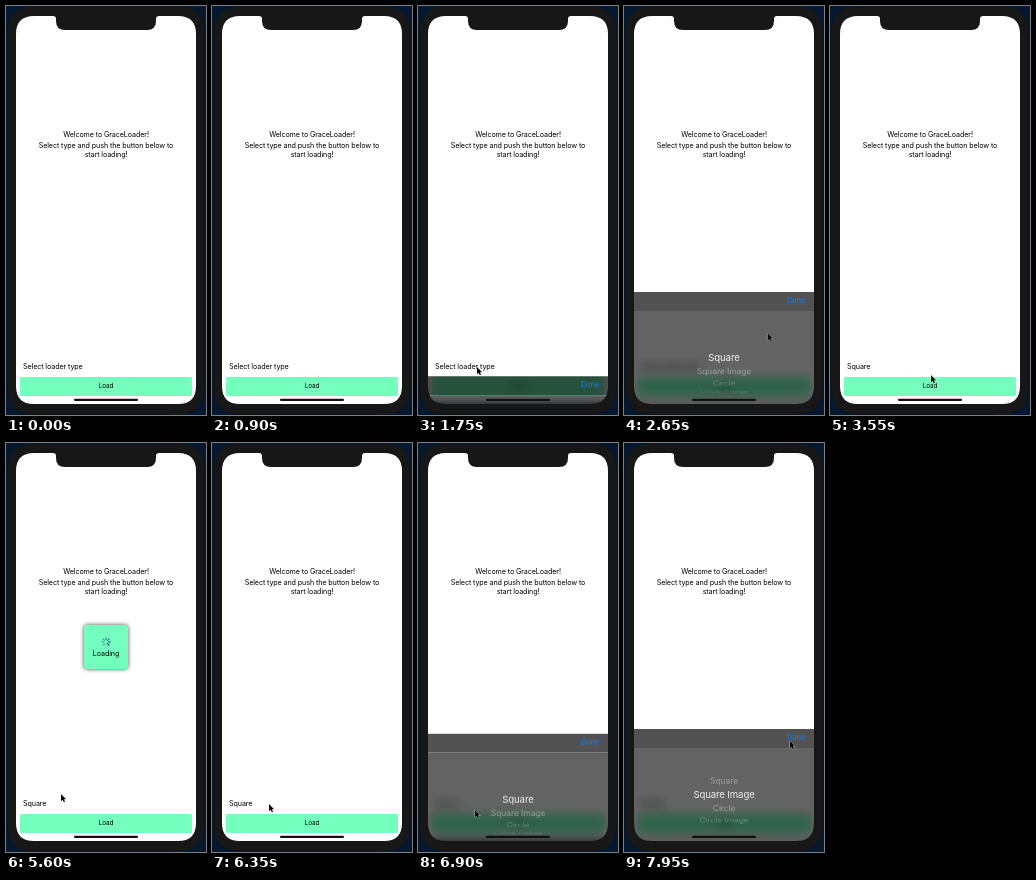
An HTML page that plays this animation: 200 by 409 pixels, repeating every 8 s.

```html
<!DOCTYPE html>
<html lang="en">
<head>
<meta charset="utf-8">
<title>Loader demo</title>
<style>
html, body { margin: 0; width: 100%; height: 100%; overflow: hidden; background: #04182f; }
#stage {
  position: relative; width: 200px; height: 409px; overflow: hidden;
  font: 7.2px/8.6px Inter, Roboto, sans-serif; letter-spacing: -.12px; color: #000;
}
#stage * { position: absolute; box-sizing: border-box; white-space: nowrap; }
#stage svg * { position: static; }
#screen { inset: 10px; bottom: 11px; background: #fff; }
.line { left: 0; width: 200px; text-align: center; }
.anim, .row { animation: 8s linear infinite; }

#load {
  left: 14px; top: 371px; width: 172px; height: 19px; border-radius: 1.5px;
  background: #74ffbe; font-size: 6.4px; line-height: 19px; text-align: center;
}
.label { left: 17px; top: 357px; }
#prompt { animation-name: prompt; }
#choice { animation-name: choice; }
@keyframes prompt { 0%, 37.24% { opacity: 1 } 37.25%, 100% { opacity: 0 } }
@keyframes choice { 0%, 37.24% { opacity: 0 } 37.25%, 100% { opacity: 1 } }

/* Loading box */
#loader {
  left: 78px; top: 182px; width: 44px; height: 44px; border-radius: 3.5px;
  background: #74ffbe; box-shadow: 0 0 4px #444; animation-name: loader;
}
#loader span { left: 0; width: 44px; top: 25px; text-align: center; }
#spinner { left: 17px; top: 12px; width: 10px; height: 10px; animation: spin 1s steps(8) infinite; }
@keyframes loader {
  0%, 48.75% { opacity: 0 }
  52.5%, 75% { opacity: 1 }
  78.75%, 100% { opacity: 0 }
}
@keyframes spin { to { transform: rotate(360deg) } }

/* Picker sheet */
#sheet { left: 10px; top: 286px; width: 180px; height: 113px; animation-name: sheet; }
#bar, #body { left: 0; width: 180px; backdrop-filter: blur(5px); }
#bar { top: 0; height: 18.5px; background: rgba(0, 0, 0, .68); }
#body { top: 18.5px; bottom: 0; background: rgba(0, 0, 0, .61); }
#done { right: 9px; top: 5px; color: #0878f5; font-size: 7.4px; font-weight: 500; }
#wheel {
  left: 0; top: 66px; width: 180px; height: 0;
  transform-style: preserve-3d; animation-name: wheel;
}
.row {
  left: 0; top: -6px; width: 180px; text-align: center; color: #eee;
  font-size: 9.6px; line-height: 12px; animation-name: row;
  --place: rotateX(calc(var(--i) * -21.8deg)) translateZ(37px);
}
@keyframes sheet {
  0%, 20.75% { transform: translateY(113px); animation-timing-function: ease }
  27%, 37.25% { transform: none; animation-timing-function: ease }
  43%, 81.625% { transform: translateY(113px); animation-timing-function: ease }
  87.875%, 100% { transform: none }
}
@keyframes wheel {
  0%, 89% { transform: rotateX(0deg); animation-timing-function: ease-in-out }
  94%, 100% { transform: rotateX(21.8deg) }
}
@keyframes row {
  0%, 89% { transform: var(--place) scale(var(--s0)); opacity: var(--o0); animation-timing-function: ease-in-out }
  94%, 100% { transform: var(--place) scale(var(--s1)); opacity: var(--o1) }
}

#cursor { left: 0; top: 0; overflow: visible; animation-name: cursor; animation-timing-function: ease-in-out; }
@keyframes cursor {
  0%, 10% { transform: translate(92px, 412px) }
  17.5%, 22.5% { transform: translate(59px, 361px) }
  29%  { transform: translate(110px, 350px); animation-timing-function: linear }
  33.125% { transform: translate(143.5px, 327.5px); animation-timing-function: ease-out }
  36.25%, 38.5% { transform: translate(172px, 295px) }
  44.375% { transform: translate(101px, 369px); animation-timing-function: ease-out }
  46%, 52% { transform: translate(101px, 377px) }
  60%, 70% { transform: translate(55px, 351px) }
  77%, 82% { transform: translate(57px, 361px) }
  86.25%, 89% { transform: translate(57px, 367px) }
  94% { transform: translate(62px, 353px) }
  99.375%, 100% { transform: translate(166px, 298px) }
}
</style>
</head>
<body>
<div id="stage">
  <div id="screen"></div>
  <div class="line" style="top:124.5px">Welcome to GraceLoader!</div>
  <div class="line" style="top:136.3px">Select type and push the button below to<br style="position:static">start loading!</div>
  <div class="label anim" id="prompt">Select loader type</div>
  <div class="label anim" id="choice">Square</div>
  <div id="load">Load</div>

  <div id="loader" class="anim">
    <svg id="spinner" viewBox="-5 -5 10 10"></svg>
    <span>Loading</span>
  </div>

  <div id="sheet" class="anim">
    <div id="bar"><div id="done">Done</div></div>
    <div id="body"></div>
    <div id="wheel" class="anim"></div>
  </div>

  <svg width="200" height="409">
    <path fill="#04182f" fill-rule="evenodd" d="M0 0H200V409H0ZM28 .5H172Q198.500 .5 198.500 28V381Q198.500 408.500 172 408.500H28Q1.500 408.500 1.500 381V28Q1.500 .5 28 .5Z"/>
    <path fill="#171717" fill-rule="evenodd" d="M28 .5H172Q198.500 .5 198.500 28V381Q198.500 408.500 172 408.500H28Q1.500 408.500 1.500 381V28Q1.500 .5 28 .5Z
      M28 10Q10 10 10 28V380Q10 398 28 398H172Q190 398 190 380V28Q190 10 172 10H153Q150 10 150 13V15Q150 24 141 24H59Q50 24 50 15V13Q50 10 47 10Z"/>
    <rect x="68" y="392.800" width="64" height="2.200" rx="1.100" fill="#111"/>
  </svg>
  <svg id="cursor" class="anim" width="6" height="9">
    <path d="M0 0V7.200L1.700 5.700 2.800 8.200 4 7.700 2.900 5.300H5.100Z" fill="#000" stroke="#fff" stroke-width=".6" paint-order="stroke"/>
  </svg>
</div>
<script>
const opacity = [1, .45, .3, .14];
const scale = offset => offset ? .89 : 1;

["Square", "Square Image", "Circle", "Circle Image"].forEach((name, i) => {
  const row = document.createElement("div");
  row.className = "row";
  row.textContent = name;
  row.style.setProperty("--i", i);
  [0, 1].forEach(selected => {
    const offset = Math.abs(i - selected);
    row.style.setProperty("--s" + selected, scale(offset));
    row.style.setProperty("--o" + selected, opacity[offset]);
  });
  document.getElementById("wheel").append(row);
});

const spokes = Array.from({ length: 8 }, (_, i) =>
  `<path d="M0-2.200V-4.300" stroke="#103a70" stroke-width="1" stroke-linecap="round"
    opacity="${.35 + i * .09}" transform="rotate(${i * 45})"/>`);
document.getElementById("spinner").innerHTML = spokes.join("");
</script>
</body>
</html>
```
